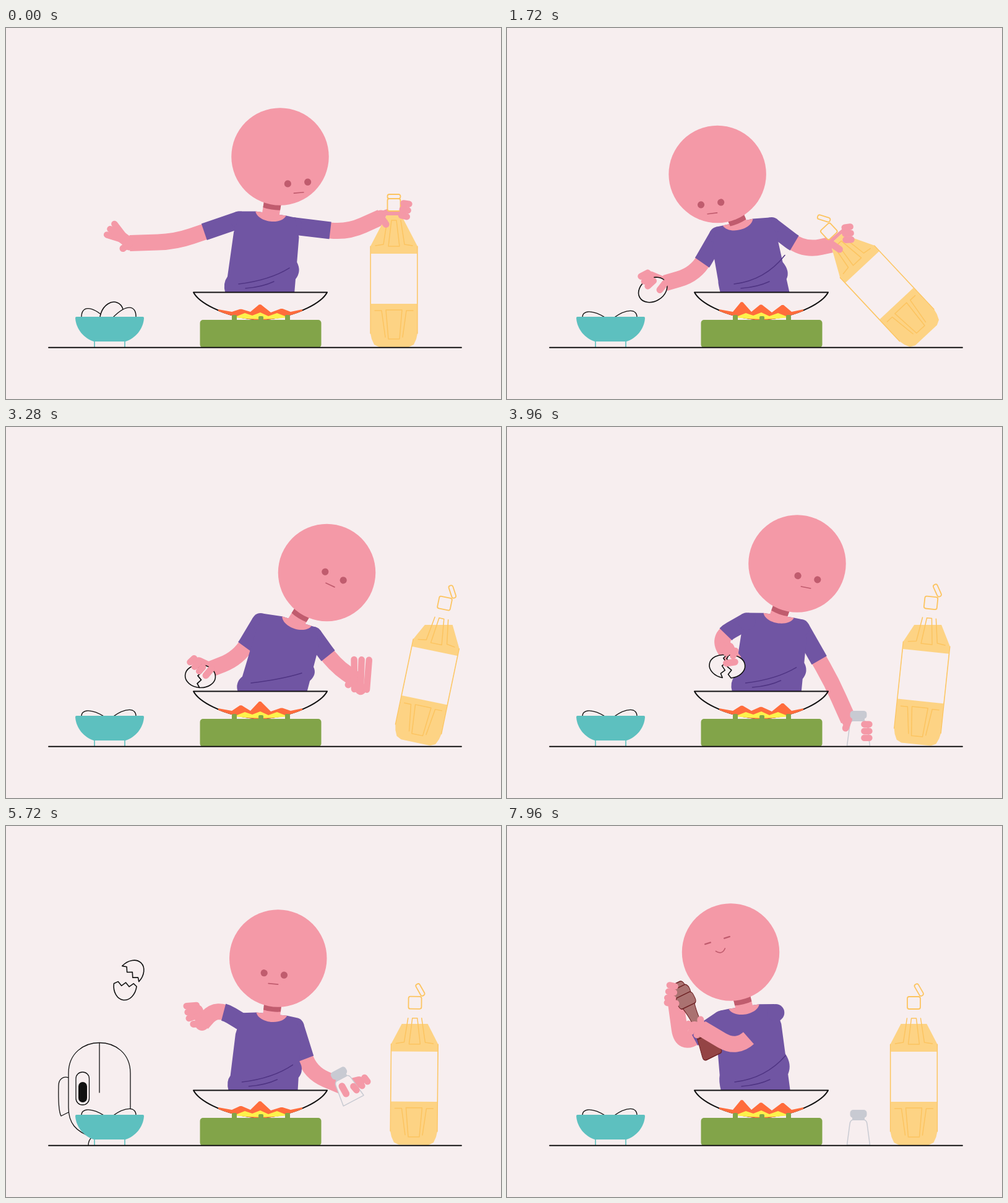
These frames come from a looping animation (800 by 600 pixels, 8 s). An HTML page with a canvas:

```html
<!DOCTYPE html>
<html lang="en">
<head>
<meta charset="utf-8">
<title>Cooking</title>
<style>
html, body { margin: 0; width: 100%; height: 100%; overflow: hidden; background: #f7eeef; }
canvas { display: block; width: 100vw; height: 100vh; }
</style>
</head>
<body>
<canvas id="stage" width="800" height="600"></canvas>
<script>
const ctx = document.getElementById('stage').getContext('2d');
const LOOP = 8000, TAU = Math.PI * 2, RAD = Math.PI / 180, GROUND = 516;
const BG = '#f7eeef', SKIN = '#f499a7', DARK = '#c05c6e', SHIRT = '#7055a3', FOLD = '#4f3483',
  INK = '#111', OIL = '#fdd384', OIL_LINE = '#fcc460', GREEN = '#82a449', TEAL = '#5dc0bf', GREY = '#c8cad2',
  WOOD = '#aa7271', WOOD_DARK = '#944445', WOOD_LINE = '#6e2224';

// Grip: gap between fingers, finger length.
const OPEN = [4, 22], GRIP = [10, 9], FLAT = [10, 48];
// Wrist, elbow bend, direction and reach of the palm, where the fingers point.
const limb = (x, y, bend, dir, reach, point, grip) => [x, y, bend, dir, reach, point, ...grip];

// head: centre, face offset, face tilt. body: collar, left hip. bottle: base, tilt.
const reachOut = {
  head: [443, 208, 28.5, 42.5, -5], body: [428, 300, 354], bottle: [627, 0],
  left: limb(200, 348, -13, 217, 17, 215, OPEN), right: limb(606, 306, 19, -20, 37, 10, GRIP)
};
const pickEgg = {
  head: [285.5, 264, -11.5, 51.5, -13], body: [336, 332, 335], bottle: [675, -32.7],
  left: limb(189, 450, -15, 190, 20, 170, [6, 16]), right: limb(552, 328, 26, -40, 28, 65, GRIP)
};
const holdEgg = {
  head: [394.5, 209, -9.5, 43.5, -1], body: [410, 296, 355], bottle: [679.7, -53.4],
  left: limb(322, 375, -30, 216, 31, 120, GRIP), right: limb(500, 372, 20, -40, 26, -75, GRIP)
};
const letGo = {
  head: [518.5, 235.5, 12, 5.5, 25], body: [470, 314, 374], bottle: [662, 11.8],
  left: limb(332, 391, -18, 205, 23, 135, GRIP), right: limb(563, 407, 8, 60, 20, -88, FLAT)
};
const salting = {
  head: [428.5, 209, 21, 37, 0], body: [414, 297, 355], bottle: [660.5, 1.2],
  left: limb(398, 371, 87, 280, 26, 95, [13, 9]), right: limb(532, 356, 66, -73, 25, 115, [12, 8])
};
const setDown = {
  head: [449, 218, -29, 16, 11], body: [442, 310, 363], bottle: [657.5, 0],
  left: limb(250, 277, -25, 227, 20, 229, OPEN), right: limb(552, 474, -4, 35, 31, 0, [11, 8])
};
const grind = {
  head: [361.5, 204, -21.5, -19, -17], body: [383, 292, 346], bottle: [657.5, 0],
  left: limb(273, 287, -62, 260, 18, 190, GRIP), right: limb(314, 327, -45, 190, 12, 120, GRIP)
};

const lerp = (a, b, u) => a + (b - a) * u;
const mix = (a, b, u) => a.map((v, i) => lerp(v, b[i], u));
const blend = (p, q, u) => Object.fromEntries(Object.keys(p).map(k => [k, mix(p[k], q[k], u)]));
const unit = (t, a, b) => Math.min(1, Math.max(0, (t - a) / (b - a)));
const smooth = u => u * u * (3 - 2 * u);
const ease = (t, a, b) => smooth(unit(t, a, b));
const polar = (x, y, deg, r) => [x + r * Math.cos(deg * RAD), y + r * Math.sin(deg * RAD)];

const takeSalt = { ...blend(letGo, salting, .55), right: setDown.right };
const poses = [[0, reachOut], [1040, pickEgg], [2400, holdEgg], [3280, letGo], [3950, takeSalt],
  [4720, salting], [6600, setDown], [7960, grind]];
const eggPath = [[1040, [171, 467, -70]], [2400, [300, 380, 8]], [3280, [314, 403, 4]], [4720, [405, 369, 0]]];
const saltPath = [[3280, [568, 590, 0]], [3950, [568, GROUND, 0]], [4720, [554, 357, -62]], [6600, [568, GROUND, 0]]];
const millPath = [[5950, [150, 490, 10, 1]], [6600, [192, 299, 64, 1]], [7960, [333, 372, -26, .6]]];

function at(keys, t, join) {
  const i = keys.findIndex(k => k[0] > t);
  if (i < 0) return keys[keys.length - 1][1];
  if (i === 0) return keys[0][1];
  const [a, p] = keys[i - 1], [b, q] = keys[i];
  return join(p, q, ease(t, a, b));
}

function paint(fill, line, width = 1.6) {
  if (fill) { ctx.fillStyle = fill; ctx.fill(); }
  if (line) { ctx.strokeStyle = line; ctx.lineWidth = width; ctx.stroke(); }
}
function poly(pts, close) {
  ctx.beginPath();
  for (let i = 0; i < pts.length; i += 2) ctx.lineTo(pts[i], pts[i + 1]);
  if (close) ctx.closePath();
}
function stroke(pts, line, width) { poly(pts); paint(null, line, width); }
function disc(x, y, r, fill) { ctx.beginPath(); ctx.arc(x, y, r, 0, TAU); paint(fill); }
function box(x, y, w, h, r, fill, line, width) {
  ctx.beginPath(); ctx.roundRect(x, y, w, h, r); paint(fill, line, width);
}
function placed(x, y, deg, draw) {
  ctx.save(); ctx.translate(x, y); ctx.rotate(deg * RAD); draw(); ctx.restore();
}
function aboveTable(draw) {
  ctx.save(); ctx.beginPath(); ctx.rect(0, 0, 800, GROUND + 1); ctx.clip(); draw(); ctx.restore();
}

// The more the body leans over its hips, the more collar and shoulders tilt.
const leanOf = ([x, , hip]) => x - hip - 56;
function shoulder(body, side) {
  const lean = leanOf(body);
  return polar(body[0] - lean * .4, body[1] + 18 - Math.abs(lean) * .15, lean * .36, 44 * side);
}

function arm([sx, sy], [wx, wy, bend, dir, reach]) {
  const d = Math.hypot(wx - sx, wy - sy);
  const ex = lerp(sx, wx, .6) - (wy - sy) / d * bend, ey = lerp(sy, wy, .6) + (wx - sx) / d * bend;
  const near = (x, y) => {
    const gap = Math.hypot(x - ex, y - ey) || 1, k = Math.min(28, gap * .6) / gap;
    return [lerp(ex, x, k), lerp(ey, y, k)];
  };
  stroke([wx, wy, ...polar(wx, wy, dir, reach)], SKIN, 18);
  disc(wx, wy, 11.5, SKIN);
  ctx.save();
  ctx.lineCap = 'butt';
  ctx.beginPath(); ctx.moveTo(sx, sy); ctx.lineTo(...near(sx, sy));
  ctx.quadraticCurveTo(ex, ey, ...near(wx, wy)); ctx.lineTo(wx, wy);
  paint(null, SKIN, 26);
  ctx.setLineDash([Math.min(60, Math.hypot(ex - sx, ey - sy) * .7), 999]);
  paint(null, SHIRT, 28);
  ctx.restore();
  disc(sx, sy, 14, SHIRT);
}

function fingers([x, y, , dir, reach, point, gap, length], side) {
  const [px, py] = polar(x, y, dir, reach);
  for (const i of [-1, 0, 1]) {
    const base = polar(px, py, point + 90, gap * i);
    stroke([...base, ...polar(...base, point + i * (11 - gap) * 2.5, length)], SKIN, 10.5);
  }
  stroke([x, y, ...polar(x, y, dir + 75 * side, 14)], SKIN, 11);
}

function seam([ax, ay], [bx, by], u, out) {
  const on = k => [lerp(ax, bx, k), lerp(ay, by, k)], [x, y] = on(u);
  ctx.lineTo(...on(u - .16));
  ctx.quadraticCurveTo(x + out, y, ...on(Math.min(1, u + .14)));
  ctx.lineTo(bx, by);
}

function torso({ body, head }) {
  const [nx, ny, hip] = body, lean = leanOf(body), tilt = lean * .45;
  const left = shoulder(body, -1), right = shoulder(body, 1);
  const c1 = polar(nx, ny, tilt, -25), c2 = polar(nx, ny, tilt, 25);
  const pitL = [left[0] - 9, left[1] + 20], pitR = [right[0] + 9, right[1] + 18];
  poly([...polar(...left, tilt - 90, 14), ...c1, ...c2, ...polar(...right, tilt - 90, 14), ...pitR]);
  seam(pitR, [hip + 112, 430], .6, 9);
  ctx.lineTo(hip, 430);
  const edge = [pitL, [hip, 430]];
  ctx.lineTo(lerp(hip, pitL[0], .02), 428);
  ctx.quadraticCurveTo(hip - 4, 413, lerp(...edge.map(p => p[0]), .72), lerp(...edge.map(p => p[1]), .72));
  ctx.lineTo(...pitL);
  paint(SHIRT);

  const fx = hip + 22, fy = 414;
  ctx.beginPath(); ctx.moveTo(fx, fy);
  ctx.quadraticCurveTo(fx + 50, fy - 6, fx + 82, 380 + lean * .45);
  if (lean < 20) { ctx.moveTo(fx + 11, fy + 7); ctx.quadraticCurveTo(fx + 38, fy + 5, fx + 57, fy - 4); }
  paint(null, FOLD, 1.5);

  placed(nx, ny, tilt, () => {
    ctx.beginPath(); ctx.moveTo(-25, 0); ctx.bezierCurveTo(-19, 17, 19, 17, 25, 0); paint(SKIN);
  });
  const hx = head[0] - nx, hy = head[1] - ny;
  placed(nx, ny, Math.atan2(hy, hx) / RAD, () => {
    ctx.beginPath(); ctx.rect(-4, -14, 44, 28); paint(SKIN);
    ctx.clip();
    disc(Math.hypot(hx, hy) - 8, 0, 78.75, DARK);
  });
}

function face([x, y, fx, fy, tilt], joy) {
  disc(x, y, 78.75, SKIN);
  placed(x + fx, y + fy, tilt, () => {
    for (const ex of [-16.2, 16.2]) {
      if (joy > .6) stroke([ex - 4.5, 0, ex + 4.5, 0], DARK, 2.4);
      else disc(ex, 0, 5.6, DARK);
    }
    ctx.beginPath(); ctx.moveTo(-7.5, 16);
    ctx.quadraticCurveTo(.5, 16 + joy * 9, 8, 16); paint(null, DARK, 1.7);
  });
}

function bottle([x, tilt], open) {
  const y = GROUND - 28 * Math.abs(Math.sin(tilt * RAD));
  placed(x, y, tilt, () => {
    ctx.beginPath(); ctx.moveTo(-12, -213);
    for (const m of [-1, 1]) {
      const side = [[38, -163], [38, -22], [36, -13], [32, -4], [24, 0]];
      for (const [px, py] of m < 0 ? side : side.reverse()) ctx.lineTo(px * m, py);
    }
    ctx.lineTo(12, -213); ctx.closePath(); paint(BG);
    ctx.save(); ctx.clip();
    ctx.rotate(-tilt * RAD); ctx.translate(-x, -y);
    ctx.fillStyle = OIL; ctx.fillRect(0, 303 + 17 * open, 800, 600);
    ctx.restore();
    ctx.fillStyle = BG; ctx.fillRect(-37, -151, 74, 81);
    for (const m of [-1, 1]) {
      stroke([38 * m, -163, 38 * m, -22], OIL_LINE, 1.2);
      stroke([11 * m, -205, 17 * m, -166, 30 * m, -164], OIL_LINE, 1.5);
      stroke([31 * m, -59, 20 * m, -59, 14 * m, -16], OIL_LINE, 1.5);
    }
    poly([-4, -205, 4, -205, 9, -163, -9, -163], true); paint(null, OIL_LINE, 1.5);
    poly([-13, -60, 13, -60, 9, -13, -9, -13], true); paint(null, OIL_LINE, 1.5);
    box(-10.5, -240, 21, 20, 3, BG, OIL_LINE, 1.8);
    placed(10.5, -240, 60 * open, () => box(-21, -7, 21, 7, 3, BG, OIL_LINE, 1.8));
  });
}

function shaker(t) {
  if (t < 3280) return;
  aboveTable(() => placed(...at(saltPath, t, mix), () => {
    ctx.beginPath(); ctx.moveTo(-18.5, 0); ctx.lineTo(-14, -34);
    ctx.quadraticCurveTo(-13, -41, -8, -41); ctx.lineTo(8, -41);
    ctx.quadraticCurveTo(13, -41, 14, -34); ctx.lineTo(18.5, 0);
    ctx.closePath(); paint(BG, GREY, 1.5);
    box(-10, -47, 20, 7, 2, GREY);
    box(-13.5, -57, 27, 13, 5, GREY);
  }));
}

function mill(t) {
  if (t < 5950) return;
  const [x, y, tilt, wide] = at(millPath, t, mix);
  placed(x, y, tilt, () => {
    ctx.scale(wide, 1);
    ctx.beginPath(); ctx.moveTo(-18, -35);
    ctx.bezierCurveTo(-10, -58, -10, -70, -18, -92); ctx.lineTo(18, -92);
    ctx.bezierCurveTo(10, -70, 10, -58, 18, -35); ctx.closePath(); paint(WOOD, WOOD_LINE);
    box(-16, -132, 32, 18, 8, WOOD, WOOD_LINE);
    box(-23, -124, 46, 18, 8, WOOD, WOOD_LINE);
    box(-25, -110, 50, 20, 7, WOOD, WOOD_LINE);
    ctx.beginPath(); ctx.moveTo(-18, -35); ctx.lineTo(-27, -6);
    ctx.quadraticCurveTo(-29, 0, -22, 1); ctx.lineTo(22, 1);
    ctx.quadraticCurveTo(29, 0, 27, -6); ctx.lineTo(18, -35);
    ctx.closePath(); paint(WOOD_DARK, WOOD_LINE);
  });
}

function egg(t) {
  if (t > 5850) return;
  const [x, y, tilt] = at(eggPath, t, mix);
  const split = ease(t, 3500, 4500), fly = unit(t, 5150, 5850);
  placed(x - 255 * fly, y + 60 * fly - 1130 * fly * (1 - fly), tilt - 300 * fly, () => {
    for (const m of [-1, 1]) placed(m * 10 * split, 0, -m * 18 * split, () => {
      ctx.beginPath();
      ctx.ellipse(0, 0, 24.5, 18.5, 0, Math.PI / 2, Math.PI * 1.5, m > 0);
      if (t > 2800) for (let i = 0; i < 5; i++) ctx.lineTo(i % 2 ? 2 : -4, i * 6.3 - 13);
      else ctx.rect(-.5, -18, 1, 36);
      if (t > 2800) ctx.closePath();
      paint(BG, t > 2800 && INK);
    });
    if (t <= 2800) { ctx.beginPath(); ctx.ellipse(0, 0, 24.5, 18.5, 0, 0, TAU); paint(BG, INK); }
  });
}

function robot(t) {
  const up = ease(t, 5300, 5600) * (1 - ease(t, 6610, 6750));
  if (!up) return;
  aboveTable(() => {
    ctx.translate(0, 170 * (1 - up));
    ctx.beginPath(); ctx.moveTo(101, 407); ctx.bezierCurveTo(93, 404, 85, 409, 85, 420);
    ctx.quadraticCurveTo(84, 460, 89, 469); ctx.lineTo(101, 463); paint(BG, INK, 1.3);
    ctx.beginPath(); ctx.moveTo(133, 517); ctx.quadraticCurveTo(133, 508, 139, 503);
    ctx.bezierCurveTo(112, 494, 101, 480, 101, 455); ctx.lineTo(101, 400);
    ctx.bezierCurveTo(101, 334, 201, 334, 201, 400); ctx.lineTo(201, 470);
    ctx.quadraticCurveTo(190, 500, 160, 505); paint(BG, INK, 1.3);
    stroke([151, 351, 151, 431], INK, 1.3);
    box(113, 398, 21.5, 53, 10.5, BG, INK, 1.3);
    box(117, 414, 14, 33, 7, INK);
  });
}

function bowlEgg(outer, inner, top) {
  const side = Math.sign(inner - outer);
  ctx.beginPath(); ctx.moveTo(outer, 469);
  ctx.bezierCurveTo(outer - side, top, outer + 16 * side, top - 1, inner, 469); paint(BG, INK, 1.4);
}

function bowl() {
  for (const x of [143, 192]) stroke([x, 506, x, GROUND], TEAL, 1.6);
  ctx.beginPath(); ctx.moveTo(112, 469); ctx.quadraticCurveTo(112, 467, 114, 467);
  ctx.lineTo(221, 467); ctx.quadraticCurveTo(223, 467, 223, 469);
  ctx.bezierCurveTo(222, 487, 209, 502, 193, 507); ctx.lineTo(142, 507);
  ctx.bezierCurveTo(126, 502, 113, 487, 112, 469); paint(TEAL);
}

function wokShape() {
  ctx.beginPath(); ctx.moveTo(303, 427.5); ctx.bezierCurveTo(310, 441, 345, 467, 411, 472);
  ctx.bezierCurveTo(477, 467, 512, 441, 519, 427.5); ctx.closePath();
}

function wokAndStove(t) {
  wokShape(); paint(BG, INK, 2);
  const wave = (mid, size, phase) => mid - size * Math.cos(TAU * (t / 480 - phase));
  const l = wave(449, 6, .55), m = wave(448.5, 4.5, .8), r = wave(450, 5, .4);
  ctx.save();
  poly([343, 455, 365, 459, 378, l, 381, l, 395, 459, 409, m, 412, m, 428, 460, 444, r, 447, r, 460, 459,
    479, 455, 479, 480, 343, 480]);
  ctx.clip();
  wokShape(); paint('#ff6c3c', '#ff6c3c', 2);
  ctx.restore();
  poly([368, 468, 386, 461, 398, 465, 411, 460, 424, 466, 438, 461, 456, 468]);
  ctx.quadraticCurveTo(412, 474, 368, 468); paint('#fdf24c');

  box(313.5, 472, 196, 45, 5, GREEN);
  for (const x of [365, 408, 451]) box(x, x === 408 ? 466 : 464, 8, 10, 2, GREEN);
}

function draw(t) {
  const p = at(poses, t, blend);
  const leftFront = t > 3900 && t < 5500, rightFront = t > 7000, millBehind = t > 7200 || t < 6050;
  const armL = () => arm(shoulder(p.body, -1), p.left), armR = () => arm(shoulder(p.body, 1), p.right);
  ctx.lineCap = ctx.lineJoin = 'round';
  ctx.fillStyle = BG; ctx.fillRect(0, 0, 800, 600);

  if (!leftFront) armL();
  if (!rightFront) armR();
  torso(p);
  face(p.head, ease(t, 6900, 7500));
  bottle(p.bottle, ease(t, 200, 1000));
  shaker(t);
  if (millBehind) mill(t);
  if (leftFront) armL();
  if (rightFront) armR();
  fingers(p.right, 1);

  const sink = 7 * ease(t, 1100, 1350), inBowl = t < 1100;
  robot(t);
  bowlEgg(122, 160, 449 + sink);
  if (inBowl) egg(t);
  bowlEgg(210, 172, 447 + sink);
  if (!inBowl) egg(t);
  fingers(p.left, -1);
  if (!millBehind) mill(t);

  wokAndStove(t);
  bowl();
  stroke([69, 516.8, 736, 516.8], INK, 1.9);
}

const start = performance.now();
function tick() {
  draw((performance.now() - start) % LOOP);
  requestAnimationFrame(tick);
}
tick();
</script>
</body>
</html>
```
